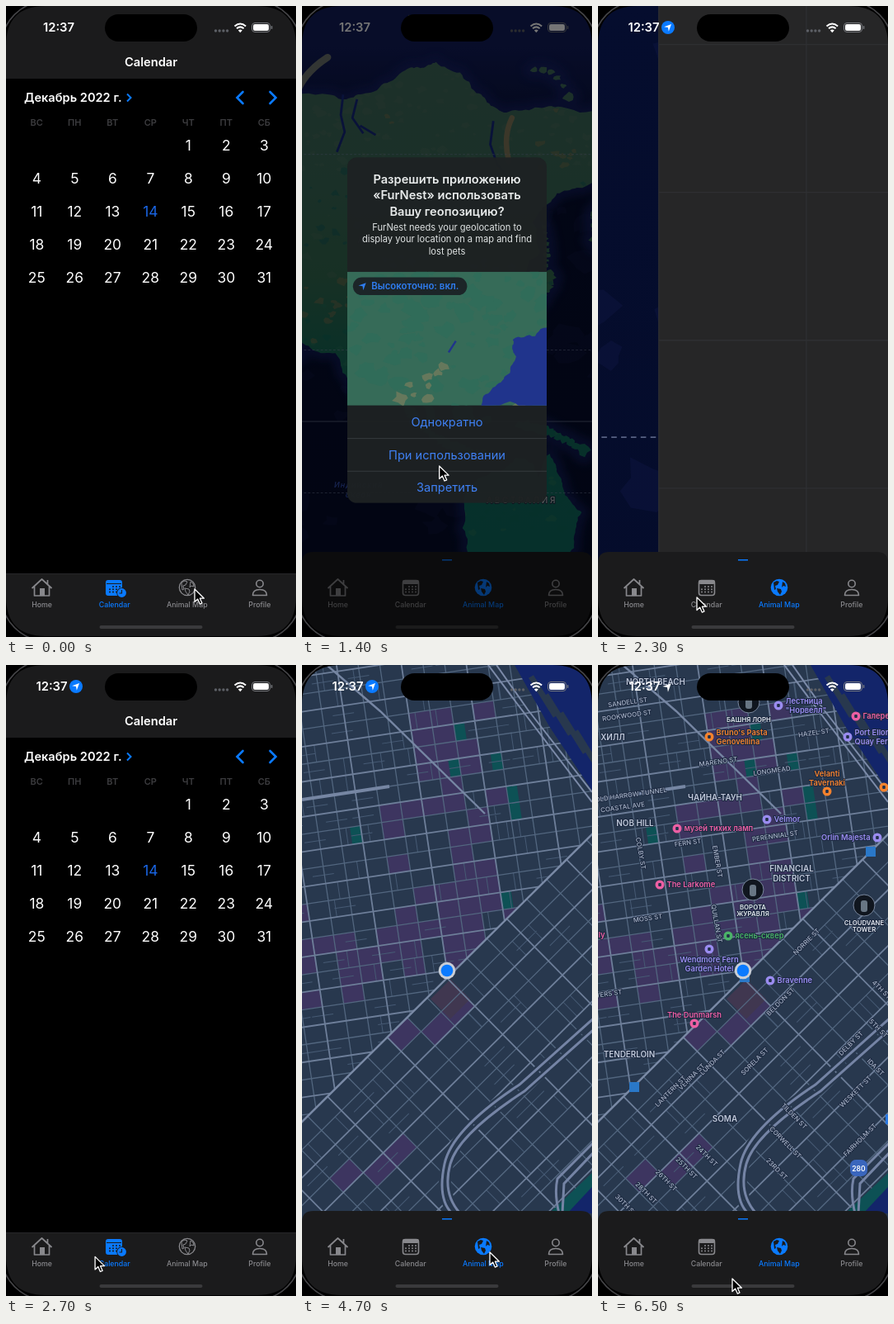
An HTML page for the animation above (6600 ms loop, 352 by 764 pixels).

```html
<!DOCTYPE html>
<html lang="ru">
<head>
<meta charset="utf-8">
<title>Calendar and map</title>
<style>
html, body { margin: 0; width: 100%; height: 100%; overflow: hidden; background: #000; }
svg { display: block; width: 352px; height: 764px; font-family: Inter, "Noto Sans", sans-serif; }
.halo { paint-order: stroke; stroke: #1c2940; stroke-width: 2px; stroke-linejoin: round; }
</style>
</head>
<body>
<svg id="stage" viewBox="0 0 352 764"></svg>
<script>
const BLUE = '#0a7aff', GREY = '#88888c', BAR = '#1b1b1c';
let seed = 7;
const rnd = (a = 0, b = 1) => {
  seed = (seed * 1664525 + 1013904223) % 4294967296;
  return a + (b - a) * seed / 4294967296;
};
const clamp = v => Math.max(0, Math.min(1, v));
const bell = (v, mid, width) => Math.exp(-(((v - mid) / width) ** 2));
const rep = (n, f) => Array.from({ length: n }, (_, i) => f(i)).join('');

// ---- markup helpers ----
const rect = (x, y, w, h, fill, more = '') => `<rect x="${x}" y="${y}" width="${w}" height="${h}" fill="${fill}" ${more}/>`;
const circle = (x, y, r, fill, more = '') => `<circle cx="${x}" cy="${y}" r="${r}" fill="${fill}" ${more}/>`;
const shape = (d, fill, more = '') => `<path d="${d}" fill="${fill}" ${more}/>`;
const line = (d, color, w, more = '') => `<path d="${d}" fill="none" stroke="${color}" stroke-width="${w}" ${more}/>`;
const group = (id, body) => `<g id="${id}">${body}</g>`;
// y is the middle of the line of text
const text = (s, x, y, size, fill, weight = 400, anchor = 'middle', more = '') =>
  `<text x="${x}" y="${(y + size * .36).toFixed(1)}" font-size="${size}" fill="${fill}" font-weight="${weight}" text-anchor="${anchor}" ${more}>${s}</text>`;
const rows = (s, x, y, gap, ...style) => s.split('|').map((l, i) => text(l, x, y + gap * i, ...style)).join('');

// closed outline through key points, roughened by midpoint displacement
function rough(spec, amp = .14) {
  let pts = spec.split(' ').map(p => p.split(',').map(Number));
  for (let depth = 0; depth < 4; depth++) {
    pts = pts.flatMap((p, i) => {
      const q = pts[(i + 1) % pts.length], k = rnd(-amp, amp);
      return [p, [(p[0] + q[0]) / 2 - (q[1] - p[1]) * k, (p[1] + q[1]) / 2 + (q[0] - p[0]) * k]];
    });
  }
  return 'M' + pts.map(p => p.map(v => v.toFixed(1))).join('L') + 'Z';
}
function blob(x, y, r) {
  return 'M' + Array.from({ length: 9 }, (_, i) => {
    const q = r * rnd(.5, 1.2), a = i * Math.PI * 2 / 9;
    return (x + q * Math.cos(a)).toFixed(1) + ' ' + (y + q * .75 * Math.sin(a)).toFixed(1);
  }).join('L') + 'Z';
}
// islands strung along a curve
const chain = (n, r, [x0, y0], [x1, y1], [x2, y2]) => rep(n, i => {
  const t = i / (n - 1), u = 1 - t;
  return blob(u * u * x0 + 2 * u * t * x1 + t * t * x2, u * u * y0 + 2 * u * t * y1 + t * t * y2, r * rnd(.6, 1.2));
});
// patches whose colour depends on where they fall
function speckle(n, [x0, y0, x1, y1], size, tone, opacity) {
  const paths = {};
  for (let i = 0; i < n; i++) {
    const x = rnd(x0, x1), y = rnd(y0, y1), c = tone(x, y);
    paths[c] = (paths[c] || '') + blob(x, y, size * rnd(.3, 1.3));
  }
  return Object.entries(paths).map(([c, d]) => shape(d, c, `opacity="${opacity}"`)).join('');
}

// ---- calendar ----
function calendar() {
  const col = i => 37.3 + 46 * i;
  const days = rep(31, i => text(i + 1, col((i + 4) % 7), 169 + 40 * Math.floor((i + 4) / 7), 17.4, i === 13 ? '#1a66e6' : '#fff'));
  const week = 'ВС ПН ВТ СР ЧТ ПТ СБ'.split(' ').map((d, i) => text(d, col(i), 141, 11, '#3c3c3f', 600)).join('');
  return rect(0, 0, 352, 764, '#000') + rect(0, 0, 352, 88, BAR) + text('Calendar', 176, 68, 14.7, '#fff', 600) +
    text('Декабрь 2022 г.', 22, 111, 14.6, '#fff', 600, 'start') + line('M147 106.5l4.5 4.5-4.5 4.5', BLUE, 2) +
    line('M287.5 104l-7 7 7 7M320.5 104l7 7-7 7', BLUE, 2.6, 'stroke-linecap="round"') + week + days;
}

// ---- world ----
const ASIA = '-140,100 0,92 50,90 105,57 138,50 190,90 232,114 300,108 420,130 420,205 320,212 275,238 262,256 272,295 240,334 212,352 232,378 220,384 192,350 204,373 194,386 204,418 150,446 158,472 142,494 122,472 140,516 126,510 98,448 75,440 40,488 8,425 -46,405 -36,430 -140,470';
const AUSTRALIA = '175,610 215,577 240,560 262,566 270,585 285,555 300,590 326,630 308,690 182,690';
const landTone = (x, y) => {
  const dry = .9 * bell(x, 20, 95) * bell(y, 350, 40) + .5 * bell(x, 95, 20) * bell(y, 135, 12) + .5 * bell(x, 290, 60) * bell(y, 160, 45);
  if (rnd() < dry) return '#75734f';
  return y < 190 ? '#4a705d' : y < 340 ? rnd() < .6 ? '#14605b' : '#44705a' : rnd() < .5 ? '#0d6a5c' : '#25735a';
};
function world() {
  const land = rough(ASIA) + rough(AUSTRALIA) +
    chain(18, 7, [100, 492], [132, 548], [200, 553]) + chain(12, 7, [240, 378], [288, 355], [285, 322]) +
    chain(9, 6, [203, 443], [198, 470], [215, 490]) + chain(8, 4.5, [277, 262], [284, 290], [280, 312]) +
    chain(12, 9, [248, 517], [285, 522], [328, 550]) + chain(8, 9, [354, 232], [340, 255], [348, 285]) +
    chain(6, 8, [265, 60], [295, 55], [308, 95]) + blob(174, 503, 20) + blob(202, 510, 8) + blob(209, 408, 6) + blob(46, 486, 5);
  const name = (s, x, y, size, gap, fill, more) => text(s, x, y, size, fill, 500, 'middle', `letter-spacing="${gap}" ${more}`);
  const dash = y => line(`M-200 ${y}H1000`, '#7b85a8', .8, 'stroke-dasharray="3 2.4" opacity=".7"');
  return `<defs><linearGradient id="sea" x2="0" y2="1"><stop stop-color="#131f5a"/><stop offset=".18" stop-color="#111c5a"/><stop offset=".33" stop-color="#050d2e"/><stop offset="1" stop-color="#040b28"/></linearGradient>
    <linearGradient id="soil" gradientUnits="userSpaceOnUse" x1="0" y1="50" x2="0" y2="660"><stop stop-color="#3f685a"/><stop offset=".25" stop-color="#396a58"/><stop offset=".45" stop-color="#33684f"/><stop offset=".65" stop-color="#116a58"/><stop offset="1" stop-color="#0e6a5e"/></linearGradient>
    <clipPath id="ground"><path d="${land}"/></clipPath>
    <filter id="soft" x="-20%" y="-20%" width="140%" height="140%"><feGaussianBlur stdDeviation="5"/></filter></defs>` +
    rect(-200, -150, 1300, 1000, 'url(#sea)') +
    speckle(170, [-150, 150, 700, 700], 20, () => '#141d4d', .3) +
    line(land, '#14246c', 18, 'filter="url(#soft)" opacity=".6" stroke-linejoin="round"') +
    shape(land, 'url(#soil)') +
    `<g clip-path="url(#ground)">${speckle(800, [-140, 60, 352, 660], 6, landTone, .55)}` +
    shape(rough('22,352 50,343 90,350 112,372 106,396 70,400 36,386', .2), '#7d7656') + line('M236 122q-12 24-4 56', '#80795a', 7, 'stroke-linecap="round"') + '</g>' +
    line('M18 92l-3 26 5 22-10 26M36 98l-6 24 14 20M40 132l20 12M212 126l-4 30 9 26 14 16', '#14277c', 3, 'stroke-linejoin="round"') +
    line('M136 281q14-5 21-26', '#14277c', 3.5) +
    line('M-44 96q8-30 42-52', '#6d7470', 9, 'stroke-linecap="round"') + shape(chain(5, 8, [106, -6], [122, 4], [138, -4]), '#75735a') +
    [169, 421, 605].map(dash).join('') + line('M-200 513H1000', '#6b7596', .8) +
    name('АЗИЯ', 57, 279, 10.5, 3, '#b7bcb8', 'class="halo"') + name('АВСТРАЛИЯ', 249, 614, 10.5, 3, '#b7c4c2', 'class="halo"') +
    name('Индийский', 38, 595, 9.5, 1.2, '#3450b4', 'font-style="italic"') + name('океан', 38, 607, 9.5, 1.2, '#3450b4', 'font-style="italic"') +
    // tiles still loading, reached at the end of the flight
    rect(674, -150, 900, 1000, '#262627') + line(rep(5, i => `M${674 + 81.4 * i} -150v1000`) + rep(9, i => `M674 ${42 + 81.4 * i}h900`), '#2e2f32', .6);
}

// ---- city ----
function grid(stepX, stepY) {
  let major = '', minor = '';
  for (let k = -25; k <= 25; k++) {
    const across = `M-600 ${k * stepY}h1200`, down = `M${k * stepX} -600v1200`;
    k % 2 ? minor += across : major += across;
    k % 3 ? minor += down : major += down;
  }
  const alleys = rep(420, () => {
    const x = (stepX * (Math.floor(rnd(-14, 14)) + rnd(.2, .8))).toFixed(1), y = stepY * Math.floor(rnd(-20, 20));
    return rnd() < .55 ? `M${x} ${y}v${stepY}` : `M${x} ${y + stepY / 2}h${stepX}`;
  });
  return line(alleys, '#465a74', 1) + line(minor, '#52667f', 1.3) + line(major, '#6d7e99', 1.8);
}
// fills whole street blocks, with a chance that depends on the place
function blocks(w, h, chance, fill) {
  let d = '';
  for (let x = -14 * w; x < 14 * w; x += w)
    for (let y = -20 * h; y < 20 * h; y += h)
      if (rnd() < chance(x + w / 2, y + h / 2)) d += `M${x} ${y}h${w}v${h}h${-w}z`;
  return shape(d, fill);
}
function city() {
  const shops = (x, y) => y < -310 ? 0 : .85 * Math.max(bell(x, 35, 45) * (y < -90), bell(y, -45, 38));
  const lofts = (x, y) => bell(x, -85, 45) * bell(y, 22, 18) + bell(x, -205, 35) * bell(y, 100, 22);
  const freeway = 'M356 426L264 508Q182 562 173 604T182 664M358 438L270 516Q190 568 180 604T192 664';
  return `<defs><clipPath id="north"><path d="M0 0H352V205L0 553z"/></clipPath><clipPath id="south"><path d="M352 205V764H0V553z"/></clipPath></defs>` +
    rect(0, 0, 352, 764, '#28384e') +
    `<g clip-path="url(#north)"><g transform="translate(176 370) rotate(-8.5)">` +
    blocks(26, 21, shops, '#3d3560') + blocks(13, 21, () => .012, '#0d5155') + grid(26, 21) + '</g>' +
    line('M30 0L95 56 222 180', '#7686a3', 2.4) + line('M0 163L60 154 106 147', '#7686a3', 4) +
    shape('M258 0H352V152L300 74z', '#13256a') + line(rep(4, i => `M${278 + 18 * i} ${14 + 22 * i}l30 48`), '#28384e', 7) +
    line('M226 0L262 48 352 166M236 0L274 54 352 154', '#7b8aa8', 2) + '</g>' +
    `<g clip-path="url(#south)"><g transform="translate(176 379) rotate(-44.7)">` +
    blocks(34, 24, lofts, '#3d3560') + rect(-32, 4, 34, 34, '#403750') + grid(34, 24) + '</g>' +
    shape('M352 615L300 664H352z', '#0d5155') + shape('M352 632L322 664H352z', '#13256a') +
    line(freeway, '#28384e', 8) + line(freeway, '#7584a5', 3) +
    line('M356 576L310 622Q306 640 312 664M356 588L318 628 316 664', '#7584a5', 3) + '</g>' +
    line('M-4 557L356 201', '#7a8aa6', 2.4);
}

// names spread evenly from one point to another
function run(angle, [x0, y0], [x1, y1], names) {
  const list = names.split('|'), last = Math.max(1, list.length - 1);
  return list.map((s, i) => {
    const x = x0 + (x1 - x0) * i / last, y = y0 + (y1 - y0) * i / last;
    return text(s, x, y, 7.9, '#aab5c9', 500, 'middle', `class="halo" transform="rotate(${angle} ${x} ${y})"`);
  }).join('');
}
const streets = () =>
  run(-8, [36, 45], [35, 61], 'SANDELL ST|ROOKWOOD ST') + run(-8, [40, 157], [30, 172], 'OLD HARROW TUNNEL|COASTAL AVE') +
  run(-8, [146, 117], [262, 82], 'MARENO ST|HAZEL ST') + run(-8, [211, 128], [215, 207], 'LONGMEAD|PERENNIAL ST') +
  run(-8, [109, 215], [12, 398], 'FERN ST|MOSS ST|IVERS ST') + run(80, [52, 228], [145, 238], 'COLBY ST|EMBER ST') + run(80, [144, 313], [144, 313], 'QUILLAN ST') +
  run(-45, [253, 335], [190, 480], 'NORRIE ST|BELDON ST|SORELA ST') + run(-45, [139, 481], [88, 516], 'LUNDA ST|VERINA ST|LANTERN ST') +
  run(-45, [307, 458], [318, 575], 'DELBY ST|WESKETT ST|FAIRHOLM ST') + run(45, [238, 546], [217, 610], 'TILDEN ST|CORWELL ST|23RD ST') +
  run(45, [132, 594], [34, 654], '24TH ST|25TH ST|26TH ST|28TH ST|30TH ST') + run(45, [344, 393], [337, 487], '4TH ST|5TH ST|IDA ST');

const AREAS = [['NORTH BEACH', 70, 20], ['Н ХИЛЛ', 13, 87], ['NOB HILL', 45, 191], ['ЧАЙНА-ТАУН', 142, 160], ['FINANCIAL|DISTRICT', 235, 246], ['TENDERLOIN', 38, 471], ['SOMA', 154, 549]];
const areas = () => AREAS.map(([s, x, y]) => rows(s, x, y, 12, 9.9, '#c0c9da', 600, 'middle', 'class="halo"')).join('');

const ORANGE = '#f5822d', VIOLET = '#9a8cf0', PINK = '#ec5fa3', GREEN = '#4bb268';
const SPOTS = [
  [ORANGE, "Bruno's Pasta|Genovellina", 135, 87, 'right'], [ORANGE, 'Velanti|Tavernaki', 278, 153, 'above'], [ORANGE, '', 347, 148, 'left'],
  [VIOLET, 'Velmor', 205, 187, 'right'], [VIOLET, 'Orlin Majesta', 339, 209, 'left'], [VIOLET, 'Лестница|"Норвелл"', 219, 49, 'right'],
  [VIOLET, 'Port Ellory|Quay Ferry', 303, 87, 'right'], [VIOLET, 'Wendmore Fern|Garden Hotel', 135, 344, 'below'], [VIOLET, 'Bravenne', 209, 382, 'right'],
  [PINK, 'Галерея', 313, 62, 'right'], [PINK, 'музей тихих ламп', 96, 198, 'right'], [PINK, 'The Larkome', 75, 266, 'right'],
  [PINK, 'The Dunmarsh', 117, 434, 'above'], [PINK, 'ly', -8, 327, 'right'], [GREEN, 'ясень-сквер', 158, 328, 'right']
];
const LANDMARKS = [['БАШНЯ ЛОРН', 183, 45], ['ВОРОТА|ЖУРАВЛЯ', 188, 272], ['CLOUDVANE|TOWER', 323, 291]];
function spot([color, label, x, y, side]) {
  const more = label.split('|').length - 1, gap = 10.5;
  const [dx, dy, anchor] = {
    right: [8.5, -more * gap / 2, 'start'], left: [-8.5, -more * gap / 2, 'end'],
    above: [0, -gap * (more + 1), 'middle'], below: [0, 13, 'middle']
  }[side];
  return circle(x, y, 5.5, color) + rect(x - 1.8, y - 2, 3.6, 4, '#22304a', 'rx="1"') +
    rows(label, x + dx, y + dy, gap, 9.3, color, 600, anchor, 'class="halo"');
}
const spots = () =>
  [[331, 226], [44, 511], [178, 378]].map(([x, y]) => rect(x - 6, y - 6, 12, 12, '#2a78c8')).join('') + rect(349, 544, 8, 12, '#2a78e0') +
  SPOTS.map(spot).join('') +
  LANDMARKS.map(([s, x, y]) => circle(x, y, 13, '#10161f', 'stroke="#78869d"') + rect(x - 4, y - 6, 8, 14, '#687684', 'rx="3"') +
    rows(s, x, y + 21, 8.6, 7.8, '#e3e7ee', 600, 'middle', 'class="halo"')).join('') +
  rect(306, 599, 21, 20, '#3a66bd', 'rx="7"') + text('280', 316.5, 609.5, 8.5, '#fff', 600);

// ---- tab bar ----
function tabs(onMap) {
  const c = onMap ? GREY : BLUE, m = onMap ? BLUE : GREY;
  const dots = rep(11, i => circle(126 + 4 * ((i + 1) % 4), 703 + 3.2 * Math.floor((i + 1) / 4), 1, onMap ? GREY : BAR));
  const lands = 'M213 698l4-2 3 1-2 4-3 1 1 4-2 1zM224 697l3 2 1 4-3-1-2 2zM217 705l5 1 1 3-2 4-3-4z';
  return (onMap ? shape('M0 674q0-13 14-13H338q14 0 14 13V764H0z', BAR) + rect(170, 670, 12, 1.5, BLUE)
    : rect(0, 687, 352, 77, BAR) + rect(0, 687, 352, .8, '#2a2a2c')) +
    line('M31.5 705L43.5 694 55.5 705M34.5 703v11h18v-11M50.5 700v-5', GREY, 1.7, 'stroke-linejoin="round"') + rect(41, 705, 6, 9, GREY) +
    (onMap ? rect(122.5, 695.5, 19, 18, 'none', `rx="3" stroke="${c}" stroke-width="1.6"`) + rect(122, 695, 20, 5, c, 'rx="2"')
      : rect(121, 695, 20, 19, c, 'rx="3"') + rect(122, 699, 18, 1, BAR)) + dots +
    (onMap ? '' : circle(140.5, 710.5, 6.3, BAR) + circle(140.5, 710.5, 5.4, c) + line('M140.5 707v4h-3', BAR, 1.1)) +
    (onMap ? circle(220, 704, 10.3, m) + shape(lands, BAR) : circle(220, 704, 9.7, 'none', `stroke="${m}" stroke-width="1.3"`) + line(lands, m, 1)) +
    circle(308, 699.5, 4.2, 'none', `stroke="${GREY}" stroke-width="1.6"`) + line('M299.5 713.5q0-7 8.5-7t8.5 7z', GREY, 1.6, 'stroke-linejoin="round"') +
    ['Home', 'Calendar', 'Animal Map', 'Profile'].map((s, i) => text(s, 43.6 + 88.1 * i, 725, 8.8, [GREY, c, m, GREY][i], 500)).join('') +
    rect(113.5, 750, 125, 4, '#3a3a3c', 'rx="2"');
}

// ---- status bar, permission sheet, bezel ----
const arrow = (x, y, k, fill) => shape('M5-5L1 6 0 0-6-1z', fill, `transform="translate(${x} ${y}) scale(${k})"`);
const status = () =>
  group('clock', text('12:37', 64, 26, 14.8, '#fff', 600)) +
  group('badge', circle(85, 26, 8, BLUE) + arrow(85, 26, .8, '#fff')) + group('plain', arrow(84, 27, .95, '#fff')) +
  rep(4, i => circle(254.5 + 4.7 * i, 30, 1.7, '#5d6066')) +
  line('M277.5 24.5q6.8-6 13.6 0M280 27.3q4.3-3.8 8.6 0', '#fff', 2) + shape('M281.8 29.5q2.5-2.2 5 0l-2.5 2.7z', '#fff') +
  rect(298.5, 20.5, 22, 11, 'none', 'rx="3.5" stroke="#77797e"') + rect(300, 22, 19, 8, '#fff', 'rx="2.2"') + rect(321.8, 24, 1.5, 4, '#77797e', 'rx=".7"');
function sheet() {
  const tone = (x, y) => rnd() < bell(y, 470, 30) * .4 ? '#868060' : '#2c6d5a';
  return `<clipPath id="card"><rect x="52" y="178" width="248" height="429" rx="12"/></clipPath><clipPath id="mini"><rect x="52" y="320" width="248" height="166"/></clipPath><g clip-path="url(#card)">` +
    rect(52, 178, 248, 429, '#1e2223', 'opacity=".96"') + '<g clip-path="url(#mini)">' + rect(52, 320, 248, 166, '#366b58') +
    speckle(130, [52, 320, 300, 490], 11, tone, .6) + shape(rough('310,386 258,404 262,425 238,460 212,500 310,500', .18), '#20348c') + line('M178 420l9-14', '#20348c', 2.5) + '</g>' +
    rect(59, 327, 142, 22, '#1c2528', 'rx="11"') + arrow(71, 338, .85, '#2f7df0') + text('Высокоточно: вкл.', 82, 338, 11.7, '#2f7df0', 600, 'start') +
    rows('Разрешить приложению|«FurNest» использовать|Вашу геопозицию?', 176, 205, 20, 15, '#e8ebeb', 600) +
    rows('FurNest needs your geolocation to|display your location on a map and find|lost pets', 176, 265, 14.7, 11.4, '#e0e4e4') +
    rect(52, 526.5, 248, .8, '#3b4043') + rect(52, 567, 248, .8, '#3b4043') +
    rows('Однократно|При использовании|Запретить', 176, 506.5, 40.7, 15, '#3f80f4') + '</g>';
}
const bezel = () => shape('M-9-9H361V773H-9zM48 0Q0 0 0 48V715Q0 763 48 763H304Q352 763 352 715V48Q352 0 304 0z', '#000', 'fill-rule="evenodd"') +
  rect(-6, -6, 364, 775, 'none', 'rx="56" stroke="#454548" stroke-width="1.6"');

stage.innerHTML =
  group('cal', calendar()) + group('world', world()) +
  group('city', city() + group('streets', streets()) + group('areas', areas()) + group('spots', spots()) +
    circle(176, 370, 10.3, '#c9ced6') + circle(176, 370, 7.3, BLUE)) +
  group('tabCal', tabs(false)) + group('tabMap', tabs(true)) + status() +
  rect(0, 0, 352, 764, '#000', 'id="dim"') + group('alert', sheet()) +
  rect(120, 10, 112, 33, '#000', 'rx="16.5"') + bezel() +
  group('cursor', shape('M0 0v15.5l3.7-3.4 2.6 6 2.7-1.2-2.6-5.7h5z', '#000', 'stroke="#fff" stroke-width="1.3" stroke-linejoin="round"'));

// ---- motion ----
// time, x, y
const CURSOR = [[0, 229, 706], [200, 229, 706], [500, 109, 722], [900, 125, 706], [1500, 170, 545], [1700, 170, 545], [1900, 152, 640],
  [2300, 120, 716], [2500, 120, 716], [3200, 60, 718], [3500, 65, 718], [4000, 215, 712], [4200, 228, 711], [5800, 228, 711], [6500, 163, 743]];
// time, scale, x, y
const FLIGHT = [[0, .94, 33, 20.8], [1700, .94, 33, 20.8], [1900, 1, 0, 0], [2300, 2.2, -1409, -404]];
function at(keys, t) {
  const i = keys.findIndex(k => k[0] > t);
  if (i < 0) return keys[keys.length - 1].slice(1);
  const a = keys[i - 1], b = keys[i], p = (t - a[0]) / (b[0] - a[0]), e = p * p * (3 - 2 * p);
  return a.slice(1).map((v, j) => v + (b[j + 1] - v) * e);
}
const el = id => document.getElementById(id);
const show = (id, opacity) => {
  el(id).style.display = opacity > 0 ? '' : 'none';
  el(id).setAttribute('opacity', +opacity);
};
const place = (id, v) => el(id).setAttribute('transform', v);
const ramp = (t, from, length) => clamp((t - from) / length);

function render(t) {
  const onWorld = t >= 300 && t < 2500, onCity = t >= 4500, onMap = onWorld || onCity;
  show('world', onWorld);
  show('city', onCity);
  show('cal', !onMap);
  show('tabCal', !onMap);
  show('tabMap', onMap);
  const [scale, x, y] = at(FLIGHT, t);
  place('world', `translate(${x} ${y}) scale(${scale})`);

  const opening = 1 - (1 - ramp(t, 300, 300)) ** 2, fade = opening * (1 - ramp(t, 1700, 200));
  show('dim', fade * .54);
  show('alert', fade);
  place('alert', `translate(176 392.5) scale(${.976 + .22 * (1 - opening)}) translate(-176 -392.5)`);

  show('streets', ramp(t, 5100, 300));
  show('areas', ramp(t, 5200, 300));
  show('spots', ramp(t, 5400, 300));

  const resting = t >= 6100;
  show('badge', t >= 2000 && !resting);
  show('plain', resting);
  place('clock', `translate(${resting ? -7.5 : -8.5 * ramp(t, 1800, 200)} 0)`);
  place('cursor', `translate(${at(CURSOR, t).join(' ')})`);
}
const start = performance.now();
function tick() {
  const t = (performance.now() - start) % 6600;
  render(Math.floor(t / 100) * 100);
  requestAnimationFrame(tick);
}
tick();
</script>
</body>
</html>
```
